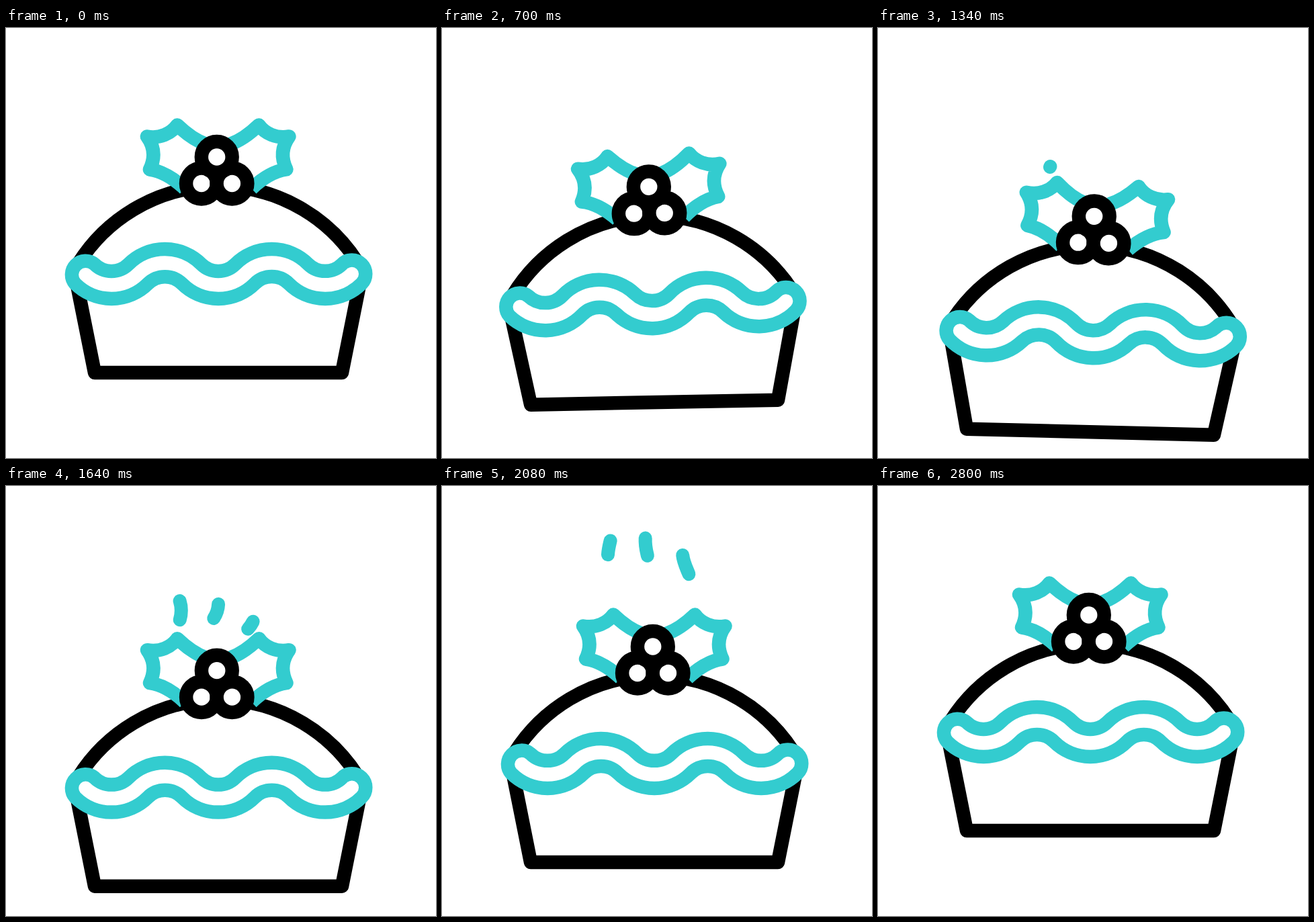
Write an HTML page that moves like this. It is 640 px wide and 640 px high and loops after 2.82 s.

```html
<!DOCTYPE html>
<html lang="en">
<head>
<meta charset="utf-8">
<title>Holiday pie</title>
<style>
  html, body { margin: 0; width: 100%; height: 100%; overflow: hidden; background: #fff; }
  svg { display: block; width: 100vw; height: 100vh; }
  path, circle { fill: none; stroke: #000; stroke-width: 20.5; stroke-linejoin: round; }
  .teal { stroke: #33cccf; }
  .white { fill: #fff; }
  .steam { stroke-width: 20; stroke-linecap: round; }
</style>
</head>
<body>
<svg viewBox="0 0 640 640">
  <g id="pie">
    <path d="M106 383 L132 513 H500 L526 383"/>
    <path d="M108 350 A246 246 0 0 1 524 350"/>
    <path id="icing" class="teal white"/>
    <g id="leaves">
      <path id="leaf" class="teal" d="M298 173 C283 168 267 156 255 144.500 C246 157 229 165 210 161.500 C222 178 222 194 214 210.500 C232 213 249 223 266 239"/>
      <use href="#leaf" transform="translate(631.500 0) scale(-1 1)"/>
    </g>
    <circle class="white" cx="291" cy="231.500" r="22.900"/>
    <circle class="white" cx="336.500" cy="231.500" r="22.900"/>
    <circle class="white" cx="313.800" cy="192" r="22.900"/>
  </g>
  <path class="teal steam" pathLength="1" d="M256 207 C263 190 262 178 256 164 C252 149 245 120 247 102 C248 84 255 76 256 40"/>
  <path class="teal steam" pathLength="1" d="M303 205 C313 194 317 183 316 170 C314 152 309 117 305.500 102 C303 92 302 82 303 74 C304 60 308 48 309 29"/>
  <path class="teal steam" pathLength="1" d="M355 218 C366 208 372 196 372 184 C372 166 372 146 367 130 C362 118 358 110 358 98 C358 82 362 70 366 50"/>
</svg>
<script>
  const LOOP = 2820, DROP = 88.7;
  const PIE_PIVOT = [316, 510], LEAF_PIVOT = [314, 241];
  const TILT = [[0, 0], [175, -4], [407, 10.1], [895, -7.8], [1228, 2.1], [1550, 0], [LOOP, 0]];
  // Start and end times of the leading and trailing end of each wisp
  const WISPS = [
    { head: [1289, 2459], tail: [1514, 2479] },
    { head: [1332, 2472], tail: [1487, 2557] },
    { head: [1416, 2466], tail: [1504, 2621] }
  ];

  const pie = document.getElementById('pie');
  const leaves = document.getElementById('leaves');
  const steam = document.querySelectorAll('.steam');

  const smooth = p => p * p * (3 - 2 * p);
  const soft = p => 0.55 * p + 0.45 * smooth(p);
  const progress = (t, [from, to]) => Math.min(1, Math.max(0, (t - from) / (to - from)));

  function icingPath() {
    const wide = dir => `a76.7 76.7 0 0 1 ${108.4 * dir} 0`;
    const tight = dir => `a36 36 0 0 0 ${50.6 * dir} 0`;
    const top = [tight(1), wide(1), tight(1), wide(1), tight(1)];
    const bottom = [wide(-1), tight(-1), wide(-1), tight(-1), wide(-1)];
    return `M131.7 351.5 ${top.join('')}a20.5 20.5 0 0 1 29 29` +
      `${bottom.join('')}A20.5 20.5 0 0 1 131.7 351.5Z`;
  }

  function tiltAt(t) {
    const i = Math.max(1, TILT.findIndex(key => key[0] > t));
    const [t0, a] = TILT[i - 1], [t1, b] = TILT[i];
    return a + (b - a) * soft(progress(t, [t0, t1]));
  }

  function draw(t) {
    const phase = Math.min(1, t / 2810);
    const dy = DROP * (1 - Math.cos(2 * Math.PI * phase)) / 2;
    const tilt = tiltAt(t);
    pie.setAttribute('transform', `translate(0 ${dy}) rotate(${tilt} ${PIE_PIVOT})`);
    // The leaves swing by the same angle again, on top of the pie
    leaves.setAttribute('transform', `rotate(${tilt} ${LEAF_PIVOT})`);

    steam.forEach((path, i) => {
      const head = smooth(progress(t, WISPS[i].head));
      const tail = smooth(progress(t, WISPS[i].tail));
      const length = head - tail;
      path.style.display = length > 0.002 ? '' : 'none';
      path.setAttribute('stroke-dasharray', `${Math.max(0, length)} 3`);
      path.setAttribute('stroke-dashoffset', -tail);
    });
  }

  document.getElementById('icing').setAttribute('d', icingPath());
  const start = performance.now();
  function tick() {
    draw((performance.now() - start) % LOOP);
    requestAnimationFrame(tick);
  }
  tick();
</script>
</body>
</html>
```
